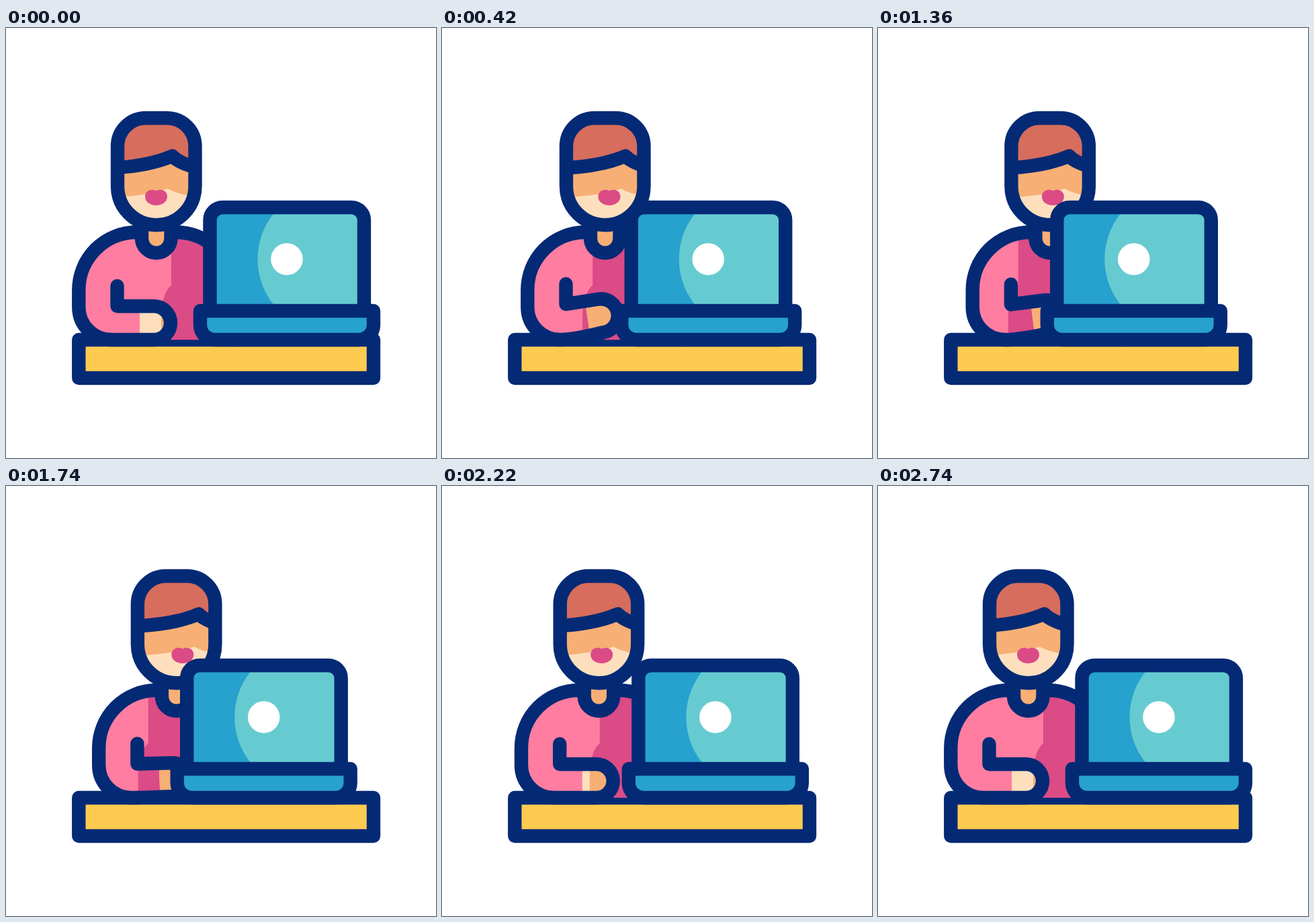
These frames come from a looping animation (640 by 640 pixels, 2.8 s). An HTML page:

```html
<!DOCTYPE html>
<html lang="en">
<head>
<meta charset="utf-8">
<title>Working at a laptop</title>
<style>
html, body { margin: 0; width: 100%; height: 100%; overflow: hidden; background: #fff; }
svg { display: block; width: 100vw; height: 100vh; }
.line { fill: none; stroke: #042a75; stroke-width: 20.4; stroke-linejoin: round; stroke-linecap: round; }
</style>
</head>
<body>
<svg viewBox="0 0 640 640">
  <defs>
    <path id="torso" d="M156.500 464A48.500 48.500 0 0 1 108.300 415.500V390A86 86 0 0 1 194 304H253A86 86 0 0 1 339 390V464"/>
    <path id="skull" d="M166 176A42 42 0 0 1 208 134H239.500A42 42 0 0 1 281.500 176V235.500A57.750 57.750 0 0 1 166 235.500Z"/>
    <path id="lid" d="M303.500 421V286A19 19 0 0 1 322.500 267H514A19 19 0 0 1 533 286V421"/>
    <path id="base" d="M289 421H547V442A22 22 0 0 1 525 464H311A22 22 0 0 1 289 442Z"/>
    <path id="neck" d="M202 298V313A21.750 21.750 0 0 0 245.500 313V298"/>
    <path id="shade" d="M246 290V383C238 389 231.500 405 231 430V470H420V290Z"/>
    <path id="hand"/>
    <clipPath id="torsoClip"><use href="#torso"/></clipPath>
    <clipPath id="skullClip"><use href="#skull"/></clipPath>
    <clipPath id="lidClip"><use href="#lid"/></clipPath>
    <clipPath id="handClip"><use href="#hand"/></clipPath>
  </defs>

  <path d="M108.300 464H547V521H108.300Z" fill="#fdcb50"/>
  <path d="M108.300 464H547V521H108.300Z" class="line"/>

  <g id="person">
    <use href="#torso" fill="#ff7da0"/>
    <g clip-path="url(#torsoClip)"><use href="#shade" class="shadow" fill="#db4b86"/></g>
    <use href="#torso" class="line"/>
    <use href="#hand" fill="#fddfbd"/>
    <g clip-path="url(#handClip)"><use href="#shade" class="shadow" fill="#f7af75"/></g>
    <path id="arm" class="line"/>
    <use href="#neck" fill="#f7af75"/>
    <use href="#neck" class="line"/>
    <use href="#skull" fill="#f7af75"/>
    <g clip-path="url(#skullClip)">
      <g id="face">
        <path d="M130 253Q206 252 241 239Q254 248 300 254V310H130Z" fill="#fddfbd"/>
        <path d="M130 209Q205 209 247.500 190.500Q260 204 300 211V120H130Z" fill="#d66d5d"/>
        <path d="M130 209Q205 209 247.500 190.500Q260 204 300 211" class="line"/>
        <path d="M223.500 242.500C218 238.500 207 241 207 251C207 259 215 264 223.500 264S240 259 240 251C240 241 229 238.500 223.500 242.500Z" fill="#db4b86"/>
      </g>
    </g>
    <use href="#skull" class="line"/>
  </g>

  <g id="laptop">
    <use href="#lid" fill="#27a1cd"/>
    <g clip-path="url(#lidClip)"><circle cx="483.500" cy="344" r="109" fill="#66cbd1"/></g>
    <circle cx="418" cy="344" r="23.800" fill="#fff"/>
    <use href="#lid" class="line"/>
    <use href="#base" fill="#27a1cd"/>
    <use href="#base" class="line"/>
  </g>
</svg>
<script>
const LOOP = 2800;
// [time in ms, value] pairs
const GAZE = [[0, 0], [420, 6.5], [660, 8], [900, 5.5], [1130, 4], [1360, 4.5],
              [1700, 9.5], [1960, 8.5], [2220, 4.5], [2740, 0], [2800, 0]];
const LIFT = [[0, 0], [420, 1], [660, .55], [900, .7], [1130, 1], [1360, .85],
              [1700, .2], [1900, 0], [2800, 0]];

const $ = id => document.getElementById(id);
const clamp = x => Math.min(1, Math.max(0, x));
const smooth = x => x * x * (3 - 2 * x);
const mix = (a, b, k) => a + (b - a) * k;
const slide = (el, x) => el.setAttribute('transform', `translate(${x} 0)`);

function track(keys, t) {
  const i = keys.findIndex(k => k[0] > t);
  const [t0, a] = keys[i - 1], [t1, b] = keys[i];
  return mix(a, b, smooth((t - t0) / (t1 - t0)));
}

// 0 = sitting back, 1 = close to the screen
function closeness(t) {
  const lean = smooth(clamp(t / 660) ** 1.3);
  const back = smooth(1 - (1 - clamp((t - 1580) / 1160)) ** 1.26);
  return lean - back;
}

function poseArm(k) {
  const at = (x0, y0, x1, y1) => `${mix(x0, x1, k)} ${mix(y0, y1, k)}`;
  const top = at(220, 414, 214, 403.5);
  const palm = `${top}A25 25 0 0 1 ${at(220, 464, 221.5, 453)}`;
  $('arm').setAttribute('d',
    `M${at(165.5, 384, 165.5, 381)}L${at(165.5, 414, 165.5, 411)}L${palm}Q177 464 157 464`);
  $('hand').setAttribute('d',
    `M${at(199, 414, 194, 407)}L${palm}L${at(199, 464, 201.5, 457)}Z`);
}

function draw(now) {
  const t = now % LOOP;
  const p = closeness(t);
  const person = 32.4 * p, laptop = -37.2 * p;
  slide($('person'), person);
  slide($('laptop'), laptop);
  slide($('face'), track(GAZE, t));
  for (const el of document.querySelectorAll('.shadow')) slide(el, laptop - person);
  poseArm(track(LIFT, t));
}

const start = performance.now();
function loop() {
  draw(performance.now() - start);
  requestAnimationFrame(loop);
}
loop();
</script>
</body>
</html>
```
